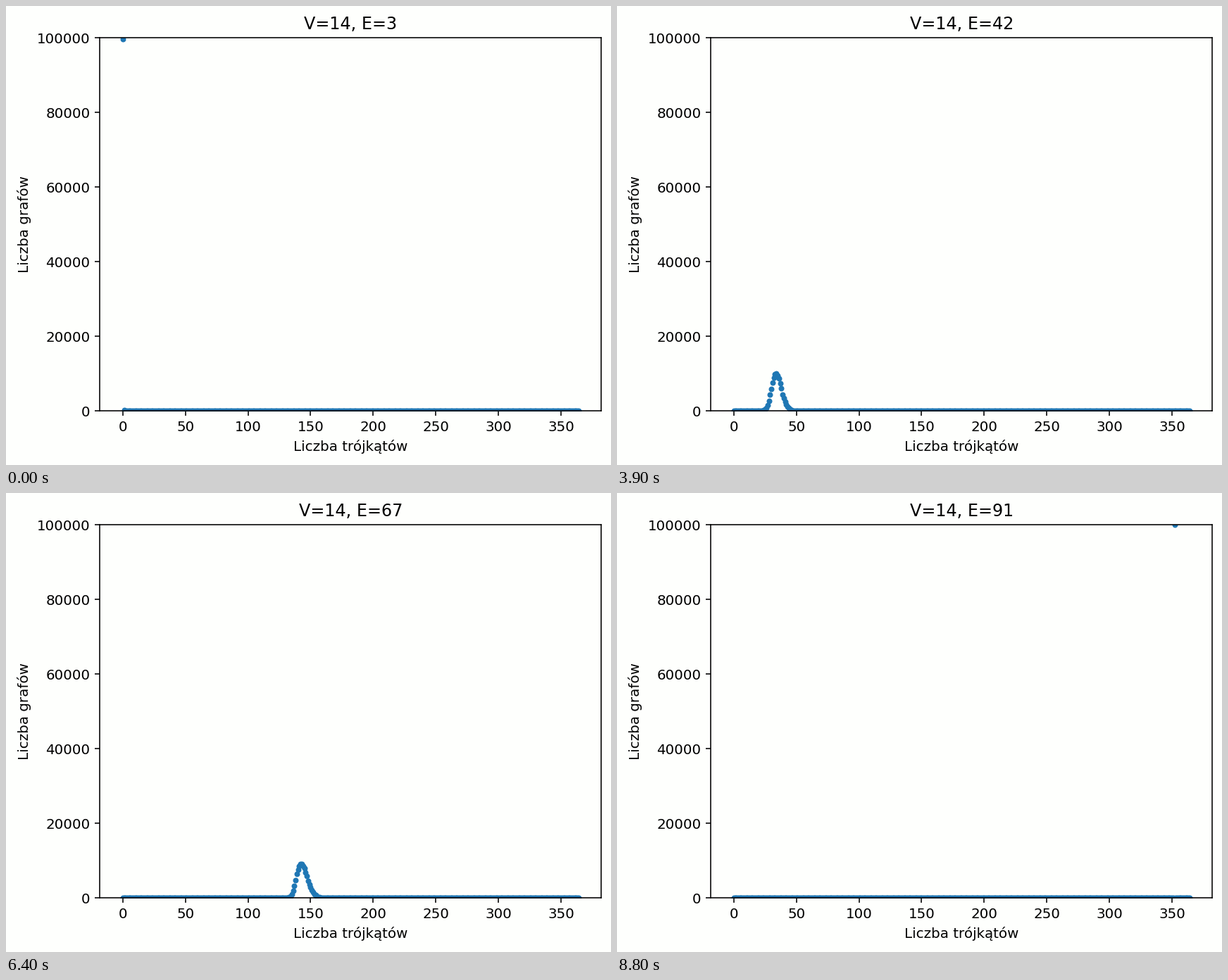
These frames come from a looping animation (859x652 px, 8.9 s). A matplotlib script:

```python
import itertools

import matplotlib.pyplot as plt
import numpy as np
from matplotlib.animation import FuncAnimation

W, H, DPI = 859, 652, 143.5
LEFT, BOTTOM = 133.45, 76.6
AX_W, AX_H = 4.96 * DPI, 3.696 * DPI
PAPER = "#fefffd"

V, SAMPLES = 14, 100_000
PAIRS = np.array(list(itertools.combinations(range(V), 2)))
MAX_TRIANGLES = V * (V - 1) * (V - 2) // 6
FIRST_E, LAST_E = 3, len(PAIRS)


def triangle_histograms():
    """Grow random graphs edge by edge; row e counts triangles at e edges."""
    rng = np.random.default_rng(14)
    order = rng.random((SAMPLES, len(PAIRS)), dtype=np.float32).argsort(axis=1)
    bits = np.array([bin(i).count("1") for i in range(1 << V)])
    rows = np.arange(SAMPLES)
    adj = np.zeros((SAMPLES, V), dtype=np.int32)
    triangles = np.zeros(SAMPLES, dtype=np.int64)
    hist = np.zeros((len(PAIRS) + 1, MAX_TRIANGLES + 1))
    hist[0, 0] = SAMPLES
    for e in range(len(PAIRS)):
        u, v = PAIRS[order[:, e]].T
        triangles += bits[adj[rows, u] & adj[rows, v]]
        adj[rows, u] |= 1 << v
        adj[rows, v] |= 1 << u
        hist[e + 1] = np.bincount(triangles, minlength=MAX_TRIANGLES + 1)
    return hist


hist = triangle_histograms()

plt.rcParams["font.family"] = "DejaVu Sans"
# The tiny surplus keeps the pixel size from rounding down.
fig = plt.figure(figsize=((W + 1e-6) / DPI, (H + 1e-6) / DPI), dpi=DPI,
                 facecolor=PAPER)
ax = fig.add_axes([LEFT / W, BOTTOM / H, AX_W / W, AX_H / H], facecolor=PAPER)
margin = 0.05 * MAX_TRIANGLES
ax.set_xlim(-margin, MAX_TRIANGLES + margin)
ax.set_ylim(0, SAMPLES)
ax.set_xticks(range(0, 351, 50))
ax.set_yticks(range(0, SAMPLES + 1, 20000))
ax.set_xlabel("Liczba trójkątów")
ax.set_ylabel("Liczba grafów")
title = ax.set_title("")
dots, = ax.plot(np.arange(MAX_TRIANGLES + 1), hist[FIRST_E], ".", color="#1f77b4")


def update(i):
    e = FIRST_E + i
    # The sampler always leaves one pair free, so the last step repeats.
    dots.set_ydata(hist[min(e, LAST_E - 1)])
    title.set_text(f"V={V}, E={e}")
    return dots, title


anim = FuncAnimation(fig, update, frames=LAST_E - FIRST_E + 1, interval=100,
                     repeat=True, repeat_delay=0, blit=False)
plt.show()
```
